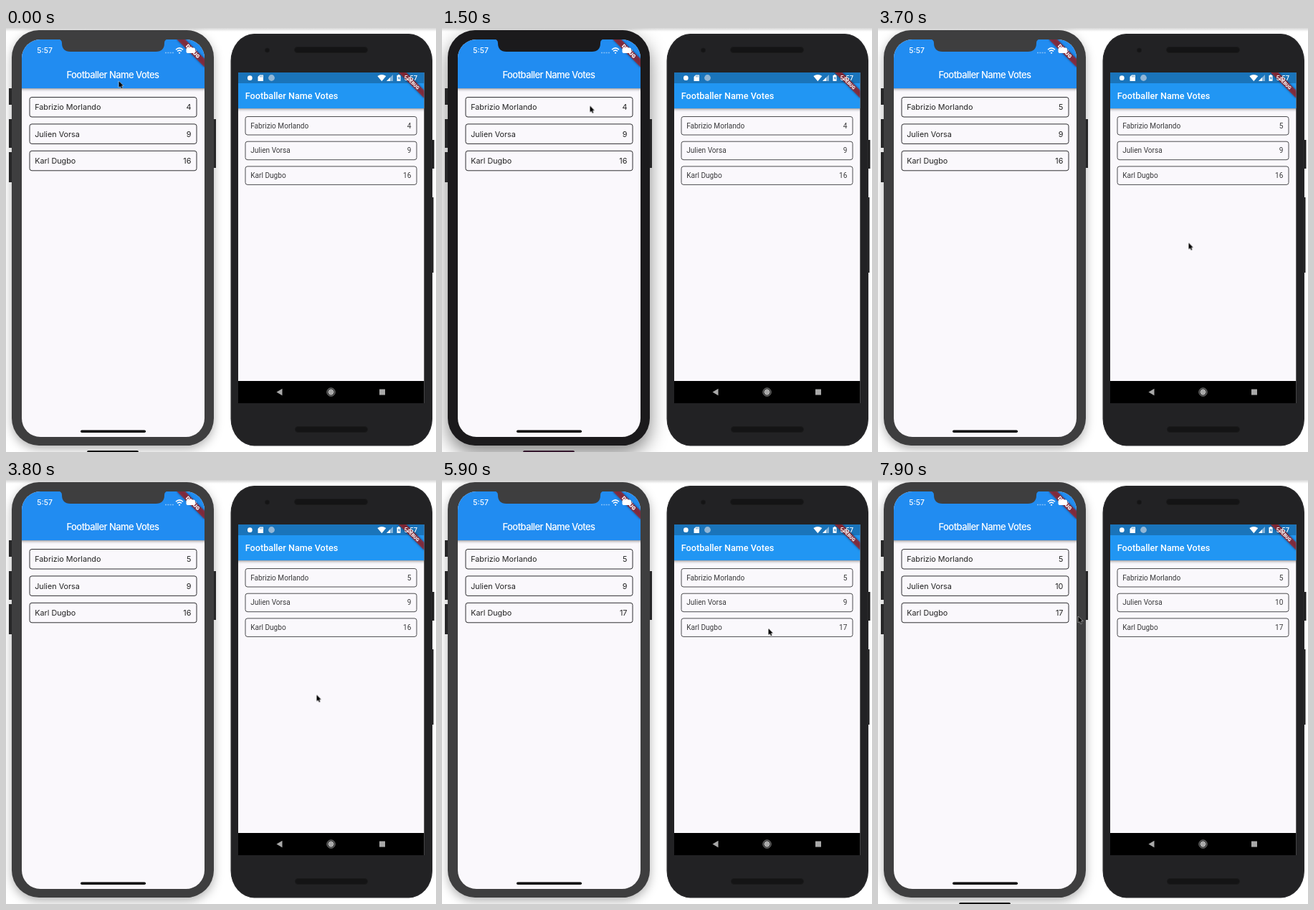
These frames come from a looping animation (600x591 px, 8000 ms). An HTML page:

```html
<!DOCTYPE html>
<html lang="en">
<head>
<meta charset="utf-8">
<title>Footballer Name Votes</title>
<style>
html, body { margin: 0; width: 100%; height: 100%; overflow: hidden; background: #fff; }
svg { display: block; width: 100%; height: 100%; }
.ios { font: 400 10.8px Inter, sans-serif; }
.android { font: 400 10.1px Roboto, sans-serif; }
.ios .title { font-size: 13px; font-weight: 500; letter-spacing: -.55px; fill: #fff; }
.android .title { font-size: 12.64px; font-weight: 500; fill: #fff; }
.ios .clock { font-size: 10.4px; font-weight: 500; fill: #fff; }
.android .clock { font-size: 9.4px; font-weight: 500; fill: #fff; }
.ios .row { fill: #222; --line: #2f2f32; }
.android .row { fill: #3a3a3c; --line: #4d4d50; }
.box { fill: none; stroke: var(--line); }
.paper { fill: #faf8fc; }
.debug { font-size: 10.2px; font-weight: 900; fill: #fff; text-anchor: middle; }
.end { text-anchor: end; }

.focus, .plain, .bar, .bezel, .vote { animation: 8s step-end infinite; }
.focus { animation-name: focus; }
.plain { animation-name: plain; }
.bar { animation-name: bar; }
.bezel { animation-name: bezel; }
.v0 { animation-name: vote0; }
.v1 { animation-name: vote1; }
.v2 { animation-name: vote2; }
@keyframes focus { 0% { opacity: 0 } 2.5% { opacity: 1 } 46.25%, 100% { opacity: 0 } }
@keyframes plain { 0% { opacity: 1 } 2.5% { opacity: 0 } 46.25%, 100% { opacity: 1 } }
@keyframes bar { 0% { opacity: 1 } 2.5% { opacity: 0 } 97.5%, 100% { opacity: 1 } }
@keyframes bezel { 0% { fill: #3e3e3f } 2.5% { fill: #1b1a1c } 46.25%, 100% { fill: #3e3e3f } }
@keyframes vote0 { 0% { opacity: 0 } 38.75%, 100% { opacity: 1 } }
@keyframes vote1 { 0% { opacity: 0 } 85%, 100% { opacity: 1 } }
@keyframes vote2 { 0% { opacity: 0 } 62.5%, 100% { opacity: 1 } }

.cursor { animation: move 8s ease-in-out infinite; }
@keyframes move {
  0%, 13% { transform: translate(157.5px, 74px) }
  18.2%, 40% { transform: translate(206.5px, 108.5px) }
  45%, 48.75% { transform: translate(433.5px, 299.5px) }
  55.6%, 60% { transform: translate(455.5px, 210.5px) }
  65%, 74.4% { transform: translate(455.5px, 207px) }
  78.1%, 91.9% { transform: translate(470px, 179px) }
  98.1%, 100% { transform: translate(279.5px, 190px) }
}
</style>
</head>
<body>
<svg viewBox="0 0 600 591" preserveAspectRatio="none">
  <defs>
    <filter id="wide" x="-30%" y="-20%" width="160%" height="140%"><feGaussianBlur stdDeviation="13"/></filter>
    <filter id="soft" x="-30%" y="-20%" width="160%" height="140%"><feGaussianBlur stdDeviation="7"/></filter>
    <filter id="ribbon" x="-30%" y="-100%" width="160%" height="300%"><feGaussianBlur stdDeviation="2.5"/></filter>
    <linearGradient id="top" x2="0" y2="1">
      <stop stop-color="#d6d6d6"/><stop offset="1" stop-color="#fff"/>
    </linearGradient>
    <linearGradient id="drop" x2="0" y2="1">
      <stop stop-opacity=".36"/><stop offset=".4" stop-opacity=".13"/><stop offset="1" stop-opacity="0"/>
    </linearGradient>
    <clipPath id="iosScreen"><rect x="22" y="16" width="255" height="554" rx="26"/></clipPath>
    <clipPath id="androidScreen"><rect x="324" y="62" width="259.3" height="461"/></clipPath>
  </defs>

  <rect width="600" height="591" fill="#fff"/>
  <rect width="600" height="5" fill="url(#top)"/>

  <rect class="focus" x="8" y="14" width="282" height="579" rx="38" fill="#000" fill-opacity=".48" filter="url(#wide)"/>
  <rect class="plain" x="8" y="8" width="282" height="579" rx="38" fill="#000" fill-opacity=".3" filter="url(#soft)"/>
  <rect class="focus" x="113" y="589" width="72" height="4" rx="2" fill="#35182e"/>
  <rect class="bar" x="113" y="589" width="72" height="4" rx="2" fill="#111"/>

  <g class="ios">
    <path d="M4 84h5v23h-5zM4 127h5v40h-5zM4 173h5v42h-5zM289 127h4v68h-4z" fill="#262627"/>
    <rect class="bezel" x="8" y="3" width="282" height="579" rx="38"/>
    <g clip-path="url(#iosScreen)">
      <rect class="paper" x="22" y="16" width="255" height="554"/>
      <rect x="22" y="84" width="255" height="5" fill="url(#drop)"/>
      <rect x="22" y="16" width="255" height="68" fill="#218cf1"/>
      <g id="iosBanner"></g>
    </g>
    <path class="bezel" d="M73 15.5h153q-5 .5-5 5.5q0 12-12 12H90q-12 0-12-12q0-5-5-5.5z"/>
    <text class="clock" x="43.3" y="35.2">5:57</text>
    <path d="M222 34.5h12" stroke="#fff" stroke-opacity=".45" stroke-width="1.5" stroke-dasharray="2 1.3"/>
    <g fill="none" stroke="#fff" stroke-width="1.5">
      <path d="M237 30.2q5-4.6 10 0M239 32.4q3-2.6 6 0"/>
      <path d="M242 33.6l1.3 1.2l-1.3 1.2l-1.3-1.2z" fill="#fff" stroke="none"/>
    </g>
    <rect x="251.5" y="27.5" width="12.5" height="7.5" rx="2" fill="#fff"/>
    <rect x="264.7" y="29.8" width="1" height="3" rx=".5" fill="#fff" fill-opacity=".6"/>
    <text class="title" x="84.4" y="70">Footballer Name Votes</text>
    <g id="iosRows"></g>
    <rect x="104" y="560.5" width="91" height="3.5" rx="1.75" fill="#050505"/>
  </g>

  <g class="android">
    <path d="M593 156h4.5v40h-4.5zM593 236h3.5v105h-3.5z" fill="#1d1d1e"/>
    <rect x="313.5" y="8" width="281.5" height="574.5" rx="33" ry="38" fill="#222224"/>
    <rect x="314.5" y="9" width="279.5" height="572.5" rx="32" ry="37" fill="none" stroke="#2b2b2d"/>
    <g fill="#141415" stroke="#1a1a1b">
      <rect x="402.5" y="26.5" width="102" height="8" rx="4"/>
      <rect x="403.5" y="555.5" width="101" height="8" rx="4"/>
      <circle cx="364.5" cy="31" r="3"/>
    </g>
    <g clip-path="url(#androidScreen)">
      <rect class="paper" x="324" y="62" width="260" height="461"/>
      <rect x="324" y="112" width="260" height="5" fill="url(#drop)"/>
      <rect x="324" y="62" width="260" height="50" fill="#2196f3"/>
      <rect x="324" y="62" width="260" height="15" fill="#1a74ba"/>
      <g id="androidBanner"></g>
      <rect x="324" y="492" width="260" height="31" fill="#000"/>
    </g>
    <circle cx="340.3" cy="69.7" r="3.4" fill="#fff"/>
    <path d="M354 65.5h5v8.5h-7.5v-6z" fill="#fff"/>
    <path d="M354.5 66.5v2M356 66.5v2M357.5 66.5v2" stroke="#1a74ba" stroke-width=".6"/>
    <circle cx="370.5" cy="69.5" r="4.4" fill="#91b6d6"/>
    <path d="M518.3 67q6-4 12 0l-6 7.3z" fill="#fff"/>
    <path d="M540 65v9h-9z" fill="#fff" fill-opacity=".45"/>
    <path d="M536 69v5h-5z" fill="#fff"/>
    <path d="M545.5 66h1.3v-1h2.4v1h1.3v8h-5z" fill="#fff"/>
    <path d="M548.6 67.3l-1.7 3h1.1v2.3l1.7-3h-1.1z" fill="#1a74ba"/>
    <text class="clock" x="555.5" y="73.2">5:57</text>
    <text class="title" x="333.8" y="99.4">Footballer Name Votes</text>
    <g id="androidRows"></g>
    <g fill="#a9a9a9">
      <path d="M377.5 507.5l8-4.7v9.4z"/>
      <circle cx="453.5" cy="507.5" r="4.2"/>
      <circle cx="453.5" cy="507.5" r="5.6" fill="none" stroke="#a9a9a9" stroke-width=".9"/>
      <rect x="521" y="503.5" width="8" height="8"/>
    </g>
  </g>

  <path class="cursor" d="M0 0v9l2-1.9l1.4 3.2l1.5-.7l-1.4-3.1h2.8z" fill="#000" stroke="#fff" stroke-width=".9" paint-order="stroke"/>
</svg>
<script>
const votes = [["Fabrizio Morlando", 4], ["Julien Vorsa", 9], ["Karl Dugbo", 16]];
const fill = (id, markup) => document.getElementById(id).innerHTML = markup;

// x, y, w, h: first box; step: distance between boxes; base: text baseline inside a box
function rows({ x, y, w, h, step, base }) {
  return votes.map(([name, count], i) => {
    const top = y + i * step, right = x + w - 7.6, ty = top + base;
    const number = n => `<text class="end" x="${right}" y="${ty}">${n}</text>`;
    return `<g class="row">
      <rect class="box" x="${x}" y="${top}" width="${w}" height="${h}" rx="3"/>
      <text x="${x + 7.2}" y="${ty}">${name}</text>${number(count)}
      <g class="vote v${i}">
        <rect class="paper" x="${right - 16}" y="${top + 4}" width="18" height="${h - 8}"/>${number(count + 1)}
      </g></g>`;
  }).join("");
}

// Corner ribbon, drawn in logical pixels from the screen's top right corner
const banner = (x, y, scale) => `<g transform="translate(${x} ${y}) scale(${scale}) rotate(45)">
  <rect x="-40" y="28" width="80" height="12" fill-opacity=".5" filter="url(#ribbon)"/>
  <rect x="-40" y="28" width="80" height="12" fill="#b71c1c" fill-opacity=".66"/>
  <text class="debug" y="37.6">DEBUG</text></g>`;

fill("iosRows", rows({ x: 33, y: 96.5, w: 233, h: 27.5, step: 37.4, base: 17.8 }));
fill("androidRows", rows({ x: 334, y: 123.5, w: 239, h: 25.5, step: 34.7, base: 16.2 }));
fill("iosBanner", banner(277, 16, .68));
fill("androidBanner", banner(583.5, 62, .632));
</script>
</body>
</html>
```
